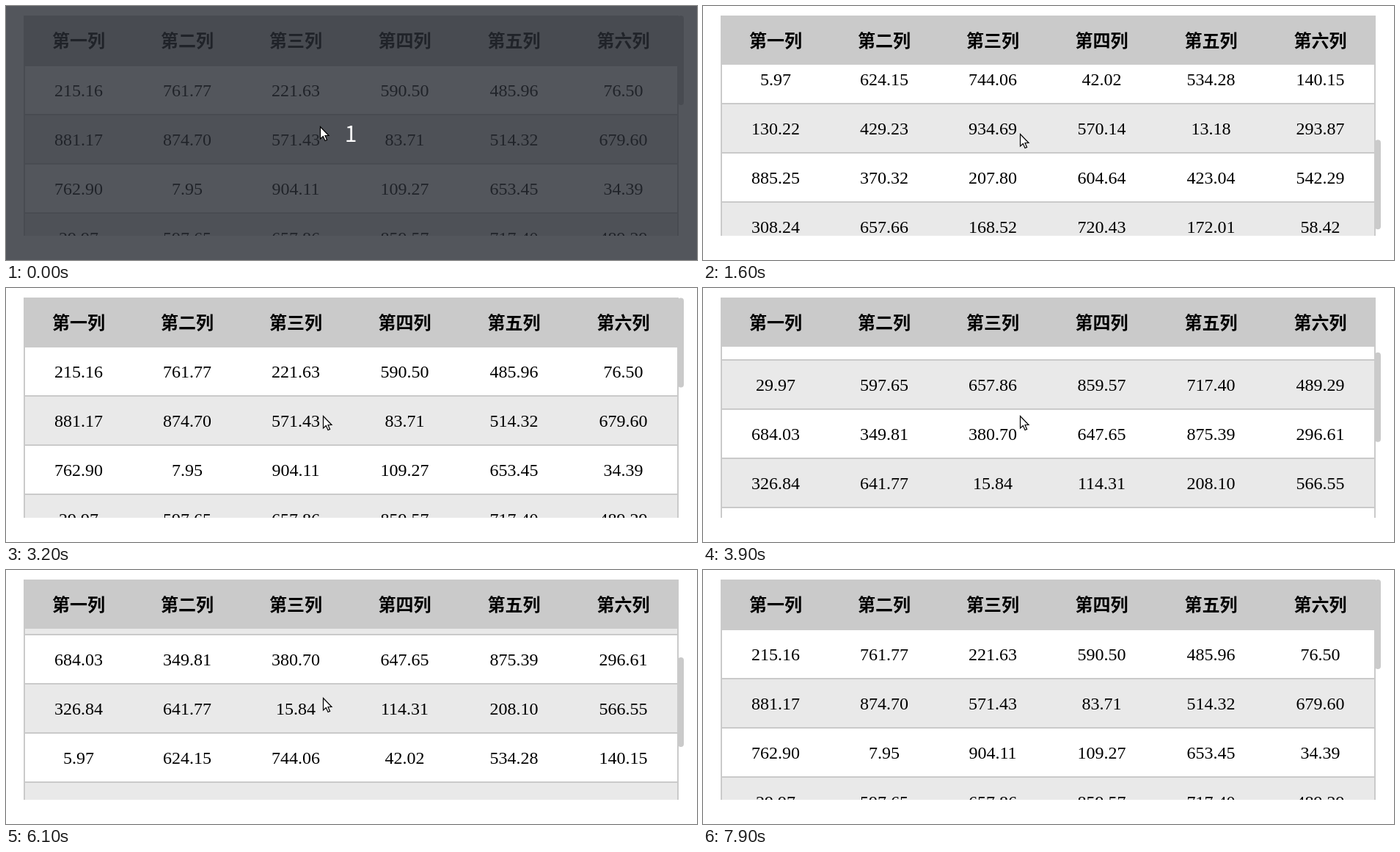
These frames come from a looping animation (942x346 px, 8.4 s). An HTML page with a canvas:

```html
<!DOCTYPE html>
<html lang="zh">
<head>
<meta charset="utf-8">
<style>
  html, body { margin: 0; width: 100%; height: 100%; overflow: hidden; background: #fff; }
  canvas { display: block; }
</style>
</head>
<body>
<canvas id="stage" width="942" height="346"></canvas>
<script>
const ctx = document.getElementById('stage').getContext('2d');
const LOOP = 8400, STEP = 100;
const TOP = 13, BOTTOM = 313, LEFT = 24, RIGHT = 917;
const HEADER_BOTTOM = 80, ROW = 67, LINE = 2;
const GRAY = '#cacaca', STRIPE = '#e9e9e9';
const CJK = '"Noto Sans CJK SC", "Noto Sans CJK", sans-serif';

const headers = ['第一列', '第二列', '第三列', '第四列', '第五列', '第六列'];
const centers = [99, 247, 395, 543.5, 692.5, 841.5];
const rows = `215.16 761.77 221.63 590.50 485.96 76.50
881.17 874.70 571.43 83.71 514.32 679.60
762.90 7.95 904.11 109.27 653.45 34.39
29.97 597.65 657.86 859.57 717.40 489.29
684.03 349.81 380.70 647.65 875.39 296.61
326.84 641.77 15.84 114.31 208.10 566.55
5.97 624.15 744.06 42.02 534.28 140.15
130.22 429.23 934.69 570.14 13.18 293.87
885.25 370.32 207.80 604.64 423.04 542.29
308.24 657.66 168.52 720.43 172.01 58.42`.split('\n').map(line => line.split(' '));

// [time in ms, scroll offset in px]
const scrollKeys = [
  [0, 0], [400, 0], [700, 22], [1000, 112], [1300, 285], [1600, 417], [1800, 439],
  [2000, 400], [2200, 250], [2400, 70], [2600, 0], [3100, 0], [3200, 1], [4000, 215],
  [4700, 423], [4800, 436], [4900, 436], [5000, 439], [5300, 439], [5700, 352],
  [5800, 352], [6100, 261], [6600, 12], [6800, 12], [7100, 0], [LOOP, 0]
];

function slope(i) {
  const a = scrollKeys[i], b = scrollKeys[i + 1];
  return a && b ? (b[1] - a[1]) / (b[0] - a[0]) : 0;
}

// Harmonic mean keeps the curve monotone between keys.
function tangent(i) {
  const before = slope(i - 1), after = slope(i);
  return before * after > 0 ? 2 * before * after / (before + after) : 0;
}

function scrollAt(t) {
  const i = scrollKeys.findIndex(key => key[0] > t) - 1;
  const [t0, s0] = scrollKeys[i], [t1, s1] = scrollKeys[i + 1];
  const span = t1 - t0, u = (t - t0) / span, v = 1 - u;
  return Math.round(s0 * (1 + 2 * u) * v * v + s1 * u * u * (3 - 2 * u)
    + span * (tangent(i) * u * v * v - tangent(i + 1) * u * u * v));
}

function cursorAt(t) {
  if (t < 1400) return [428, 164];
  if (t < 7800) return [432, 174];
  return t < 7900 ? [260, 111] : null;
}

function rect(color, x, y, w, h) {
  ctx.fillStyle = color;
  ctx.fillRect(x, y, w, h);
}

function textRow(cells, font, y) {
  ctx.font = font;
  ctx.fillStyle = '#000';
  cells.forEach((cell, i) => ctx.fillText(cell, centers[i], y));
}

function drawTable(scroll) {
  const width = RIGHT - LEFT;
  ctx.save();
  ctx.beginPath();
  ctx.rect(LEFT, TOP, width, BOTTOM - TOP);
  ctx.clip();
  rows.forEach((cells, i) => {
    const y = HEADER_BOTTOM + i * ROW - scroll;
    rect(i % 2 ? STRIPE : '#fff', LEFT, y, width, ROW);
    rect(GRAY, LEFT, y, width, LINE);
    textRow(cells, '24px "Liberation Serif", serif', y + 43);
  });
  rect(GRAY, LEFT, HEADER_BOTTOM + rows.length * ROW - scroll, width, LINE);
  rect(GRAY, LEFT, TOP, LINE, BOTTOM - TOP);
  rect(GRAY, RIGHT - LINE, TOP, LINE, BOTTOM - TOP);
  rect(GRAY, LEFT, TOP, width, HEADER_BOTTOM - TOP);
  textRow(headers, 'bold 24px ' + CJK, 56);
  ctx.restore();
}

function drawThumb(scroll) {
  ctx.fillStyle = GRAY;
  ctx.beginPath();
  ctx.roundRect(916, TOP + scroll * 0.406, 8, 122, 4);
  ctx.fill();
}

function drawCursor(x, y) {
  const arrow = new Path2D('M.5 .5V17L4.3 13.5L7 19.5L9.6 18.4L7 12.5H12Z');
  ctx.save();
  ctx.translate(x, y);
  ctx.fillStyle = '#fff';
  ctx.strokeStyle = '#000';
  ctx.lineWidth = 1.2;
  ctx.fill(arrow);
  ctx.stroke(arrow);
  ctx.restore();
}

function drawCountdown() {
  rect('rgba(40, 44, 52, .8)', 0, 0, 942, 346);
  ctx.font = '30px ' + CJK;
  ctx.fillStyle = '#fff';
  ctx.fillText('1', 470, 185);
}

function draw(now) {
  const t = Math.floor(now % LOOP / STEP) * STEP;
  const scroll = scrollAt(t), cursor = cursorAt(t);
  ctx.textAlign = 'center';
  rect('#fff', 0, 0, 942, 346);
  drawTable(scroll);
  drawThumb(scroll);
  if (t < STEP) drawCountdown();
  if (cursor) drawCursor(...cursor);
  requestAnimationFrame(draw);
}

draw(performance.now());
</script>
</body>
</html>
```
